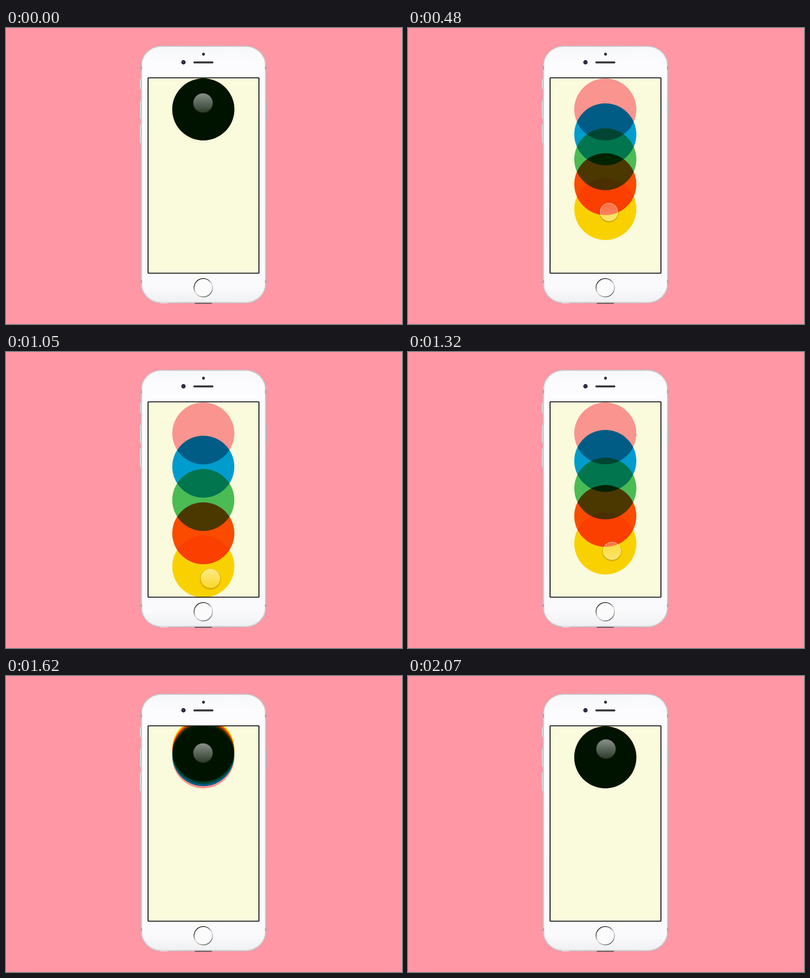
Recreate the animation shown at these times as an HTML page. Size 800 px wide and 600 px high, loop 2100 ms.

```html
<!DOCTYPE html>
<html lang="en">
<head>
<meta charset="utf-8">
<title>Stretching circles</title>
<style>
  html, body { margin: 0; width: 100%; height: 100%; overflow: hidden; background: #ff97a5; }
  svg { display: block; width: 800px; height: 600px; }
  #screen { isolation: isolate; }
  #discs circle { mix-blend-mode: multiply; }
</style>
</head>
<body>
<svg viewBox="0 0 800 600">
  <defs>
    <clipPath id="glass"><rect x="287" y="101" width="224" height="396"/></clipPath>
    <linearGradient id="rim">
      <stop offset="0" stop-color="#c3c4c6"/>
      <stop offset=".012" stop-color="#dedfe1"/>
      <stop offset=".5" stop-color="#d4d5d7"/>
      <stop offset=".988" stop-color="#dedfe1"/>
      <stop offset="1" stop-color="#c0c1c3"/>
    </linearGradient>
    <linearGradient id="face" x2="0" y2="1">
      <stop offset="0" stop-color="#f7f8fa"/>
      <stop offset=".06" stop-color="#fcfcfe"/>
      <stop offset=".94" stop-color="#fafafc"/>
      <stop offset="1" stop-color="#f0f1f3"/>
    </linearGradient>
    <linearGradient id="ring" x1=".2" y1="0" x2=".75" y2="1">
      <stop offset="0" stop-color="#1c1c1c"/>
      <stop offset=".3" stop-color="#66625f"/>
      <stop offset=".55" stop-color="#d9d9d9"/>
      <stop offset=".8" stop-color="#aaa7a4"/>
      <stop offset="1" stop-color="#55524f"/>
    </linearGradient>
    <linearGradient id="idle" x2="0" y2="1">
      <stop offset="0" stop-color="#fff" stop-opacity=".54"/>
      <stop offset="1" stop-color="#fff" stop-opacity=".17"/>
    </linearGradient>
    <linearGradient id="held" x2="0" y2="1">
      <stop offset="0" stop-color="#fff" stop-opacity=".26"/>
      <stop offset="1" stop-color="#fff" stop-opacity=".4"/>
    </linearGradient>
    <radialGradient id="shade">
      <stop offset=".8" stop-color="#3a2800" stop-opacity=".28"/>
      <stop offset="1" stop-color="#3a2800" stop-opacity="0"/>
    </radialGradient>
    <mask id="outside" maskUnits="userSpaceOnUse" x="-30" y="-30" width="60" height="60">
      <rect x="-30" y="-30" width="60" height="60" fill="#fff"/>
      <circle id="hole" fill="#000"/>
    </mask>
  </defs>

  <rect width="800" height="600" fill="#ff97a5"/>
  <rect x="10" y="599" width="758" height="1" fill="#fd9299"/>

  <!-- side buttons -->
  <g fill="#f4f4f5" stroke="#bdb6b8" stroke-width="1">
    <rect x="270.5" y="103.5" width="4" height="20" rx="1"/>
    <rect x="270.5" y="147.5" width="4" height="37" rx="1"/>
    <rect x="270.5" y="195.5" width="4" height="38" rx="1"/>
    <rect x="523" y="147.5" width="3.5" height="37" rx="1"/>
  </g>

  <!-- body -->
  <rect x="272.5" y="36.5" width="253" height="521" rx="41" fill="url(#rim)" stroke="#bdb9bb"/>
  <rect x="275" y="38.5" width="248" height="516.5" rx="38.5" fill="url(#face)"/>
  <g fill="#a9a9ac">
    <rect x="272" y="77" width="3" height="7"/>
    <rect x="523" y="77" width="3" height="7"/>
    <rect x="272" y="511" width="3" height="6"/>
    <rect x="523" y="511" width="3" height="6"/>
  </g>
  <rect x="381" y="557" width="35" height="2" rx="1" fill="#5b5658"/>
  <path d="M312 557.5h14" stroke="#f3eeee" stroke-width="1.5" stroke-dasharray="3 1"/>

  <!-- front parts -->
  <circle cx="399" cy="53" r="2.9" fill="#35353b"/>
  <circle cx="358.5" cy="69.5" r="4.4" fill="#25253a"/>
  <circle cx="358.5" cy="69.5" r="2" fill="#34376a"/>
  <rect x="378.5" y="67.7" width="40.5" height="4" rx="2" fill="#343438"/>
  <circle cx="398.5" cy="526.5" r="18.6" fill="#fbfbfc" stroke="url(#ring)" stroke-width="1.8"/>

  <g clip-path="url(#glass)">
    <g id="screen">
      <rect x="287" y="101" width="224" height="396" fill="#fafadc"/>
      <g id="discs"></g>
    </g>
  </g>
  <rect x="287" y="101" width="224" height="396" rx="1" fill="none" stroke="#26272b" stroke-width="2.2"/>

  <g id="touch">
    <circle id="shadow" cy="1.5" fill="url(#shade)" mask="url(#outside)"/>
    <circle id="idleDot" fill="url(#idle)"/>
    <circle id="heldDot" fill="url(#held)" stroke="#fff" stroke-opacity=".5" stroke-width="1.2"/>
  </g>
</svg>
<script>
  const LOOP = 2100, STEP = 30;
  const COLORS = ['#ff97a5', '#009fee', '#4cbf61', '#ff4c00', '#ffd600'];

  // time, gap between discs, touch x, touch y
  const MOVES = [
    [0, 0, 398, 152], [120, 2.5, 397.5, 163], [240, 12.4, 397, 207],
    [360, 31, 400, 291], [480, 50.5, 406, 373], [600, 64, 410, 433],
    [750, 69, 412, 457], [900, 68, 413, 460], [1050, 67.5, 413, 459],
    [1140, 67, 413, 455], [1230, 63.5, 413, 438], [1320, 55.8, 412, 403],
    [1410, 36, 408, 325], [1500, 14, 403, 232], [1560, 3.5, 400, 187],
    [1620, -4.5, 398, 156], [1710, -4, 397, 142], [1830, -1, 398, 143],
    [1950, -0.1, 399, 146], [2070, -0.1, 400, 148], [2100, 0, 398, 152]
  ];
  // time, pressure
  const PRESS = [[0, 0], [120, 1], [570, 1], [720, 0], [1080, 0], [1200, 1], [1500, 1], [1620, 0], [2100, 0]];

  const $ = id => document.getElementById(id);
  const set = (el, attrs) => { for (const k in attrs) el.setAttribute(k, attrs[k]); };

  const discs = COLORS.map(fill => {
    const c = document.createElementNS('http://www.w3.org/2000/svg', 'circle');
    set(c, { cx: 398.6, r: 62.7, fill });
    return $('discs').appendChild(c);
  });

  const segment = (table, t) => Math.max(0, table.findIndex(row => row[0] > t) - 1);

  function linear(table, t) {
    const i = segment(table, t), [t0, a] = table[i], [t1, b] = table[i + 1];
    return a + (b - a) * (t - t0) / (t1 - t0);
  }

  // Hermite curve through the table, flat at turning points
  function smooth(table, t, col) {
    const i = segment(table, t), last = table.length - 1;
    const rate = k => (table[k + 1][col] - table[k][col]) / (table[k + 1][0] - table[k][0]);
    const slope = k => {
      if (k === 0 || k === last) return 0;
      const a = rate(k - 1), b = rate(k);
      return a * b > 0 ? 2 * a * b / (a + b) : 0;
    };
    const span = table[i + 1][0] - table[i][0];
    const u = (t - table[i][0]) / span, v = 1 - u;
    return v * v * (1 + 2 * u) * table[i][col] + u * u * (3 - 2 * u) * table[i + 1][col]
      + span * u * v * (v * slope(i) - u * slope(i + 1));
  }

  function draw(ms) {
    const t = Math.floor((ms % LOOP) / STEP) * STEP;
    const [gap, x, y] = [1, 2, 3].map(col => smooth(MOVES, t, col));
    const press = linear(PRESS, t), r = 19.6 - 1.6 * press;
    discs.forEach((c, i) => set(c, { cy: 165 + gap * i }));
    set($('touch'), { transform: `translate(${x} ${y})` });
    set($('hole'), { r });
    set($('shadow'), { r: r + 3 });
    set($('idleDot'), { r, opacity: 1 - press });
    set($('heldDot'), { r: r - 0.3, opacity: press });
  }

  const start = performance.now();
  function tick() {
    draw(performance.now() - start);
    requestAnimationFrame(tick);
  }
  draw(0);
  requestAnimationFrame(tick);
</script>
</body>
</html>
```
